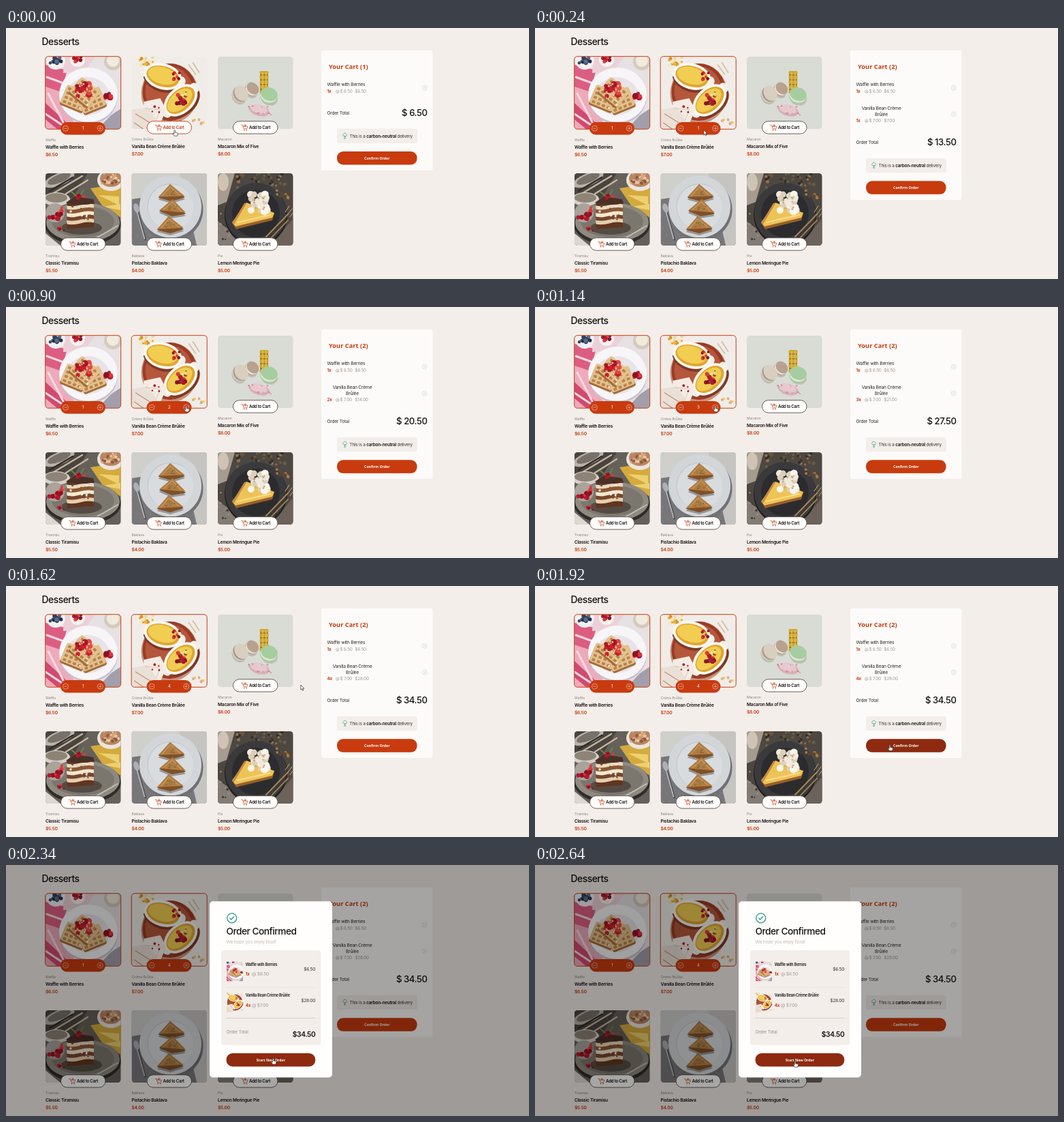
Write an HTML page that moves like this. It is 768 by 368 pixels and loops after 2700 ms.

```html
<!DOCTYPE html>
<html lang="en">
<head>
<meta charset="utf-8">
<title>Desserts</title>
<style>
html, body { margin: 0; width: 100%; height: 100%; overflow: hidden; background: #f3eeea; }
svg { display: block; }
text { font-family: Inter, sans-serif; letter-spacing: -.035em; }
.heavy { font-family: "Noto Sans", sans-serif; letter-spacing: 0; }
.light { letter-spacing: 0; }
</style>
</head>
<body>
<svg id="stage" width="768" height="368" viewBox="0 0 768 368"><defs id="photos"></defs><g id="scene"></g></svg>
<script>
const RED = '#c73b0f', DARK_RED = '#8e2a10', INK = '#141110', GRAY = '#a39a95', GREEN = '#2f9a80';
const LOOP = 2700, STEP = 60;

// Drawing helpers
const rect = (x, y, w, h, fill, r = 0, more = '') =>
  `<rect x="${x}" y="${y}" width="${w}" height="${h}" rx="${r}" fill="${fill}" ${more}/>`;
const oval = (x, y, rx, ry, fill, turn = 0, more = '') =>
  `<ellipse rx="${rx}" ry="${ry}" fill="${fill}" transform="translate(${x} ${y}) rotate(${turn})" ${more}/>`;
const dot = (x, y, r, fill, more) => oval(x, y, r, r, fill, 0, more);
const shape = (d, fill) => `<path d="${d}" fill="${fill}"/>`;
const line = (d, color, w = 1) =>
  `<path d="${d}" fill="none" stroke="${color}" stroke-width="${w}" stroke-linecap="round" stroke-linejoin="round"/>`;
const at = (x, y, body, scale = 1, turn = 0) =>
  `<g transform="translate(${x} ${y}) rotate(${turn}) scale(${scale})">${body}</g>`;
const text = (x, y, s, size, fill = INK, weight = 400, anchor = 'start', cls = '') =>
  `<text x="${x}" y="${y}" font-size="${size}" fill="${fill}" font-weight="${weight}" text-anchor="${anchor}" class="${cls}">${s}</text>`;
const money = n => n.toFixed(2);

let seed = 7;
const random = () => (seed = seed * 16807 % 2147483647) / 2147483647;
const scatter = (n, x, y, w, h, r, colors) => Array.from({ length: n }, (_, i) =>
  dot(x + random() * w, y + random() * h, r * (.7 + random() * .6), colors[i % colors.length])).join('');

// Photos, each on a 110.5 x 106 field
const berries = ['#b3182c', '#d93a3c', '#8c1224'];

function waffle() {
  const slab = (x, y, turn) => {
    let holes = '';
    for (let i = 0; i < 16; i++) holes += rect(-15 + i % 4 * 7.8, -13 + (i >> 2) * 6.8, 5, 4, '#b98450', 1);
    return at(x, y, rect(-18, -12, 36, 28, '#a56c39', 3) + rect(-18, -16, 36, 29, '#e4c18c', 3) + holes, 1, turn);
  };
  return rect(0, 0, 111, 107, '#e6e1e3') +
    shape('M0 12L32 20 20 60 0 54z', '#dc5d82') + shape('M0 44L24 52 46 107H0z', '#eeaabb') +
    shape('M0 68l42 39H18L0 92z', '#d14a70') + shape('M28 0h45L57 22 26 24z', '#ecd0d8') +
    line('M4 54l22 42M0 84l30 20M2 30l22 8', '#f9d9df', 3) +
    dot(15, 5, 14, '#f2f0f1') + scatter(14, 7, 0, 17, 10, 2.5, ['#34415c', '#596c89', '#222c47']) +
    dot(47, 4, 11, '#f6f3f2') + scatter(9, 41, 0, 12, 8, 2.6, berries) +
    dot(99, 7, 13, '#d6cabb') + dot(99, 6, 9, '#f1eade') +
    shape('M96 86l15-10v31H76z', '#a29eab') + oval(63, 59, 43, 40, '#c6bfca') + oval(63, 56, 43, 40, '#f7f5f7') +
    oval(62, 58, 32, 28, '#e8e3e7') + slab(43, 62, 22) + slab(68, 65, -22) + slab(57, 53, 40) +
    scatter(13, 46, 38, 20, 20, 3.8, ['#c52228', '#e2493f', '#a71623']) +
    scatter(9, 46, 40, 20, 16, 1.3, ['#f3b9a4']) + scatter(6, 87, 46, 9, 16, 3.5, berries) +
    scatter(8, 40, 32, 34, 44, 1, ['#fbf4ea']);
}

function brulee() {
  const dish = (x, y, size, turn) => at(x, y, oval(1, 3, 31, 21, '#7f3826') +
    oval(-29, 0, 7, 8, '#f3eee7') + oval(29, 0, 7, 8, '#f3eee7') +
    oval(0, 0, 30, 20, '#fbf8f2') + oval(0, 0, 26, 16, '#e0a632') + oval(-1, -1, 23, 13, '#f1cd52'), size, turn);
  return rect(0, 0, 111, 107, '#f0ede8') + scatter(18, 12, 0, 20, 16, 2.2, ['#f0b435', '#e8d8a4', '#d98f2a', '#f5e8c2']) +
    oval(56, 54, 42, 44, '#c7937c') + oval(56, 52, 40, 42, '#9b3b25') + oval(55, 51, 35, 37, '#b5573b') +
    dish(46, 29, .95, 16) + dish(72, 64, .95, -42) +
    shape('M18 66l24-5 9 17-9 20-26 2z', '#f4ece4') + shape('M0 78l24-4 22 33H0z', '#e9e0d7') +
    line('M6 84l24 15M4 97l13 9', '#c98c76', 1.3) + line('M20 76l22 2-6 15', '#d9c9bb', 1) +
    scatter(9, 60, 23, 10, 12, 2, berries) + scatter(13, 65, 52, 15, 18, 2.5, berries) +
    scatter(7, 65, 52, 16, 18, 1.4, ['#4f7033', '#fae7a2']) + scatter(4, 29, 73, 12, 12, 1.7, berries) +
    line('M84 12l10 14M90 9l9 14', '#d9c2a8', 2) + scatter(7, 88, 90, 18, 12, 1.8, ['#edc653', '#dba9a0']);
}

function macaron() {
  const biscuit = (x, y, r, turn, main, cream) => at(x, y,
    oval(2, 4, r, r * .8, '#bdbdb4') + oval(0, 2, r, r * .8, main) + oval(0, 0, r, r * .82, cream) + oval(0, -2, r, r * .78, main), 1, turn);
  return rect(0, 0, 111, 107, '#d9dbd5') +
    rect(62, 21, 12, 34, '#a6801c', 3) + [24, 31, 38, 45, 52].map(y => rect(61.5, y - 3, 13, 5, '#cfa735', 2)).join('') +
    line('M66 23v30M71 23v30', '#e9c956', 1.2) + biscuit(50, 48, 10, 45, '#b7a18f', '#eee5d9') +
    biscuit(33, 55, 12, 55, '#d8cfc0', '#a99889') + biscuit(75, 57, 12.5, 18, '#a6cda0', '#dcebd2') +
    oval(61, 79, 15, 8, '#d9adb6', 14) + oval(60, 77, 13, 6, '#e8c8cf', 14) +
    scatter(16, 44, 72, 36, 14, 1.2, ['#d3a0ab', '#efd9dc', '#c58995']);
}

function tiramisu() {
  const layers = ['#55372a', '#ead8bd', '#8a5734', '#f3e7d0', '#76452a', '#e5cfae', '#62351f'];
  return rect(0, 0, 111, 107, '#65605a') + shape('M0 0h62L40 36 0 44z', '#494440') +
    oval(20, 9, 24, 9, '#b9b2a8', -22) + oval(20, 8, 18, 6, '#78716a', -22) +
    line('M2 35L54 4M30 30L62 10', '#c5b49b', 2.5) + line('M6 26L40 6', '#2f2b28', 2.5) +
    shape('M66 22l45-7v50L85 50z', '#d5aa3d') + shape('M78 32l30 2v13zM84 49l26-4v9z', '#edd170') +
    oval(96, 10, 20, 16, '#ece5df') + oval(96, 8, 16, 12, '#b98562') + scatter(24, 83, 0, 25, 15, 2, ['#d9a67b', '#8d5b3d', '#e8c5a0']) +
    oval(16, 38, 20, 10, '#d6d0c8') + oval(16, 36, 16, 7, '#8d8377') +
    oval(55, 75, 56, 31, '#2f2c29') + oval(55, 72, 54, 29, '#8f8a80') + oval(55, 71, 46, 23, '#7c776e') +
    oval(53, 80, 30, 10, '#544c44') +
    layers.map((c, i) => shape(`M31 ${42 + i * 5.4}q10 2 20 -1t20 -1v6.4l-39 3z`, c)).join('') +
    shape('M30 43l13-9 27 4 2 6q-22 5-42-1z', '#4a3025') + scatter(14, 33, 48, 34, 24, 1.6, ['#f7ecd8', '#7b4c31']) +
    scatter(7, 44, 32, 15, 7, 2.5, berries) + line('M45 33l-7-6M52 31l4-7', '#65883e', 2) +
    dot(14, 58, 14, '#aaa39b') + scatter(18, 5, 50, 19, 17, 2.8, berries) + scatter(6, 16, 79, 14, 6, 2, berries) +
    shape('M0 88l23 19H0z', '#dcd7d1') + line('M76 94l30-17', '#c4beb4', 2);
}

function baklava() {
  const pastry = (x, y, turn) => at(x, y,
    shape('M-19 9L-2-10 20 10 0 15z', '#979795') + shape('M-19 6L-1-13 20 7 0 12z', '#805028') +
    shape('M-19 5L-1-13 20 5z', '#b07d45') + line('M-13 3.5L-1-9 13 3.5', '#cda163', 1) +
    scatter(10, -6, -4, 13, 7, .9, ['#7b7337', '#936030']), 1, turn);
  let weave = '';
  for (let i = 0; i < 130; i++) weave += dot(i % 13 * 9 + (Math.floor(i / 13) % 2) * 4, 3 + Math.floor(i / 13) * 11, .6, '#99999b');
  return rect(0, 0, 111, 107, '#77777a') + weave + shape('M0 0h111v66L82 26 0 38z', '#cfcfcc') + shape('M70 0h41v107H96z', '#c5c4c1') +
    dot(59, 53, 46, '#707174') + dot(57, 49, 45.5, '#d3d6d9') + dot(57, 49, 34, '#bfc3c7') + dot(57.5, 49.5, 33.5, '#d9dcdf') +
    pastry(58, 29, -2) + pastry(60, 51, 5) + pastry(56, 76, -3) +
    line('M9 58l11 39', '#494a4d', 3) + line('M8 57l11 39', '#b9babc', 1.8) + oval(7, 51, 4, 7, '#aeb0b3', -18);
}

function lemonPie() {
  return rect(0, 0, 111, 107, '#4d4741') + shape('M0 0h25L13 42 0 47z', '#a69b8f') + oval(8, 13, 8, 13, '#cfc3b3') +
    scatter(38, 28, 0, 72, 22, 2, ['#72543a', '#302b26', '#94734b', '#62624a']) +
    shape('M0 70l18 14 23 23H0z', '#837c75') + scatter(16, 0, 58, 22, 40, 1.5, ['#a38b77', '#443c36']) +
    shape('M76 107l35-41v41z', '#6c6259') + dot(56, 61, 46, '#1f1e1f') + dot(56, 59, 45, '#3a3a3c') + dot(56, 59, 35, '#2c2c2f') +
    shape('M22 74l20-30 41 15-3 10-53 13z', '#98602b') + shape('M21 72l21-29 41 15-3 7-54 13z', '#eec356') +
    line('M40 45L23 73', '#c88942', 3) + line('M29 72l48-11', '#f7dd8c', 2) +
    scatter(30, 48, 30, 25, 27, 4.6, ['#f1e9da', '#faf6ed', '#ddd0ba']) + scatter(10, 48, 34, 22, 22, 1.3, ['#c7a781']) +
    line('M71 93l32-33M77 96l26-27', '#ad884f', 1.8) + line('M99 57l6-9M103 60l6-8M106 64l5-7', '#d0ae72', 1) +
    scatter(9, 85, 24, 20, 14, 2, ['#a77a44', '#60442b']);
}

const products = [
  { kind: 'Waffle', name: 'Waffle with Berries', price: 6.5, photo: waffle },
  { kind: 'Crème Brûlée', name: 'Vanilla Bean Crème Brûlée', price: 7, photo: brulee },
  { kind: 'Macaron', name: 'Macaron Mix of Five', price: 8, photo: macaron },
  { kind: 'Tiramisu', name: 'Classic Tiramisu', price: 5.5, photo: tiramisu },
  { kind: 'Baklava', name: 'Pistachio Baklava', price: 4, photo: baklava },
  { kind: 'Pie', name: 'Lemon Meringue Pie', price: 5, photo: lemonPie }
];
document.getElementById('photos').innerHTML =
  `<clipPath id="frame">${rect(0, 0, 110.5, 106, '#000', 4.5)}</clipPath>` +
  products.map((p, i) => `<g id="photo${i}" clip-path="url(#frame)">${p.photo()}</g>`).join('');

// Interface parts
const trolley = line('M-4.5-3.6h1.8l1.6 5.4h4.7l1-3.6H-2M1-4.6v3M-.4-3h2.8', RED, .7) + dot(-.6, 3.6, .8, RED) + dot(3, 3.6, .8, RED);
const tree = line('M-2.4 0a2 2 0 0 1-.4-3.6 3 3 0 0 1 5.6 0A2 2 0 0 1 2.4 0zM0 0v4.2M-1.8 4.2h3.6M0 2l1.7-2', GREEN, .8);
const ring = (x, y, r, color, mark, w = .6) => at(x, y, dot(0, 0, r, 'none', `stroke="${color}" stroke-width="${w}"`) + line(mark, color, w));
const button = (x, y, w, label, hover) =>
  rect(x, y, w, 19.5, hover ? DARK_RED : RED, 9) + text(x + w / 2, y + 11.7, label, 5.2, '#fff', 700, 'middle', 'heavy');

function card(p, i, count, hover) {
  const drop = count ? .9 : 0;
  const label = hover ? RED : INK;
  return at(58 + i % 3 * 126.5, i < 3 ? 42 : 213,
    `<use href="#photo${i}"/>` +
    (count
      ? rect(-.3, -.3, 111, 106.6, 'none', 4.5, `stroke="${RED}" stroke-width="1"`) + rect(22, 96, 66, 18.5, RED, 9.2) +
        ring(29.5, 105.2, 4, '#f6d3c6', 'M-1.8 0h3.6') + ring(80.3, 105.2, 4, '#f6d3c6', 'M-1.8 0h3.6M0-1.8v3.6') +
        text(55.2, 107.4, count, 6.2, '#fff', 400, 'middle')
      : rect(22.5, 94.7, 65.5, 18.4, '#fffefd', 9.2, `stroke="${hover ? RED : '#5d4c45'}" stroke-width=".9"`) +
        at(39.2, 104, trolley) + text(46, 106.2, 'Add to Cart', 6.1, label, 600)) +
    text(0, 123.2 + drop, p.kind, 5, '#8a807b', 400, 'start', 'light') +
    text(0, 134 + drop, p.name, 6.6, INK, 600) +
    text(0, 144.7 + drop, '$' + money(p.price), 6.7, RED, 600));
}

function cartLine(y, p, count) {
  return text(471.5, y, count + 'x', 6.2, RED, 700) + text(484, y, '@', 6, GRAY) +
    text(490.5, y, '$ ' + money(p.price), 6.5, GRAY) + text(512.3, y, '$' + money(p.price * count), 6.5, GRAY);
}

function cart(count, hover) {
  const shift = count ? 43.3 : 0, cross = 'M-1.3-1.3l2.6 2.6M1.3-1.3l-2.6 2.6';
  return rect(463, 33, 163.5, 175.7 + shift, '#fdfbf9', 3) +
    text(474, 59.6, `Your Cart (${count ? 2 : 1})`, 9.3, RED, 700, 'start', 'heavy') +
    text(471.5, 85.3, products[0].name, 6.75, '#2f2927') + cartLine(94.7, products[0], 1) + ring(614.7, 87.7, 3.5, '#c6beb9', cross, .5) +
    (count ? text(508.5, 120, 'Vanilla Bean Crème', 6.75, '#2f2927', 400, 'middle') + text(508.5, 128.7, 'Brûlée', 6.75, '#2f2927', 400, 'middle') +
      cartLine(137.8, products[1], count) + ring(614.7, 126.5, 3.5, '#c6beb9', cross, .5) : '') +
    at(0, shift,
      text(471.5, 126.6, 'Order Total', 6.6, '#2f2927') +
      text(618.5, 129.2, '$ ' + money(6.5 + 7 * count), 13.2, INK, 500, 'end') +
      rect(486, 147.6, 118, 21.4, '#f3eeea', 3) + at(497.6, 158.4, tree, .8) +
      text(504.5, 160.6, 'This is a <tspan font-weight="600" fill="#141110">carbon-neutral</tspan> delivery', 6.45, '#3b3330') +
      button(486, 181, 117.6, 'Confirm Order', hover));
}

function dialog(count, hover) {
  const item = (i, n) => at(0, i * 45.5,
    `<svg x="324" y="141.5" width="24" height="29" viewBox="0 0 110.5 106" preserveAspectRatio="xMidYMid slice"><use href="#photo${i}"/></svg>` +
    text(351.7, 147.6, products[i].name, 5.5, INK, 600) + text(351.7, 162, n + 'x', 6.2, RED, 700) +
    text(361, 162, '@ $' + money(products[i].price), 6.7, GRAY) +
    text(454.3, 155, '$' + money(products[i].price * n), 6.7, '#3b3330', 400, 'end'));
  return rect(0, 0, 768, 368, '#000', 0, 'opacity=".35"') + rect(299, 53.3, 180, 258.2, '#fffefd', 5) +
    ring(331.7, 77.8, 7, GREEN, 'M-3 .2l2 2 4-4.2', 1.3) +
    text(323.4, 102.2, 'Order Confirmed', 13.7, INK, 500) + text(323.4, 115.2, 'We hope you enjoy food!', 6.7, '#c2bab5') +
    rect(316, 125, 146.3, 139, '#f3eeea', 4) + item(0, 1) + item(1, count) +
    line('M324 179.5H454', '#e6deda', .6) + line('M324 224.5H454', '#cfc6c1', .8) +
    text(323.4, 247, 'Order Total', 6.6, '#9b928d') + text(454.3, 252.2, '$' + money(6.5 + 7 * count), 10.2, INK, 600, 'end') +
    button(323.6, 276, 130.6, 'Start New Order', hover);
}

const arrow = `<path d="M0 0v7.6l1.8-1.6 1.2 2.7 1.2-.5L3 5.5h2.4z" fill="#fff" stroke="#222" stroke-width=".7"/>`;
const hand = `<path d="M-.9.8q.9-1.5 1.7 0v3l3.4.8q.8.4.6 1.5l-.8 3.1H-.6L-3 5.8q0-1 .8-.8l1.3 1z" fill="#fff" stroke="#222" stroke-width=".7"/>`;

// Pointer stops: time, x, y
const path = [[0, 247.8, 149.5], [300, 247.8, 149.5], [480, 248.7, 144], [720, 264.5, 145], [1380, 264.5, 145],
  [1620, 432.8, 145], [1800, 521, 232.8], [2040, 521, 232.8], [2400, 382, 287.5], [LOOP, 382, 287.5]];
const clicks = [240, 780, 1080, 1320];
const confirmTime = 1980;

function pointer(t) {
  const i = path.findIndex(p => p[0] > t), [t0, x0, y0] = path[i - 1], [t1, x1, y1] = path[i];
  const k = (t - t0) / (t1 - t0), ease = k * k * (3 - 2 * k);
  return [x0 + (x1 - x0) * ease, y0 + (y1 - y0) * ease];
}

function render(t) {
  const count = clicks.filter(c => t >= c).length, open = t >= confirmTime, [x, y] = pointer(t);
  const onConfirm = !open && y > 224, onRestart = open && x < 454 && y > 276;
  const onCard = !count || (x > 260 && x < 270);
  return text(52.5, 25.2, 'Desserts', 13.9, INK, 500) +
    products.map((p, i) => card(p, i, [1, count][i] || 0, i === 1)).join('') +
    cart(count, onConfirm) + (open ? dialog(count, onRestart) : '') +
    at(x, y, onCard || onConfirm || onRestart ? hand : arrow, .95);
}

const scene = document.getElementById('scene');
let shown = -1;
function tick() {
  const t = Math.floor(performance.now() % LOOP / STEP) * STEP;
  if (t !== shown) scene.innerHTML = render(shown = t);
  requestAnimationFrame(tick);
}
tick();
</script>
</body>
</html>
```
